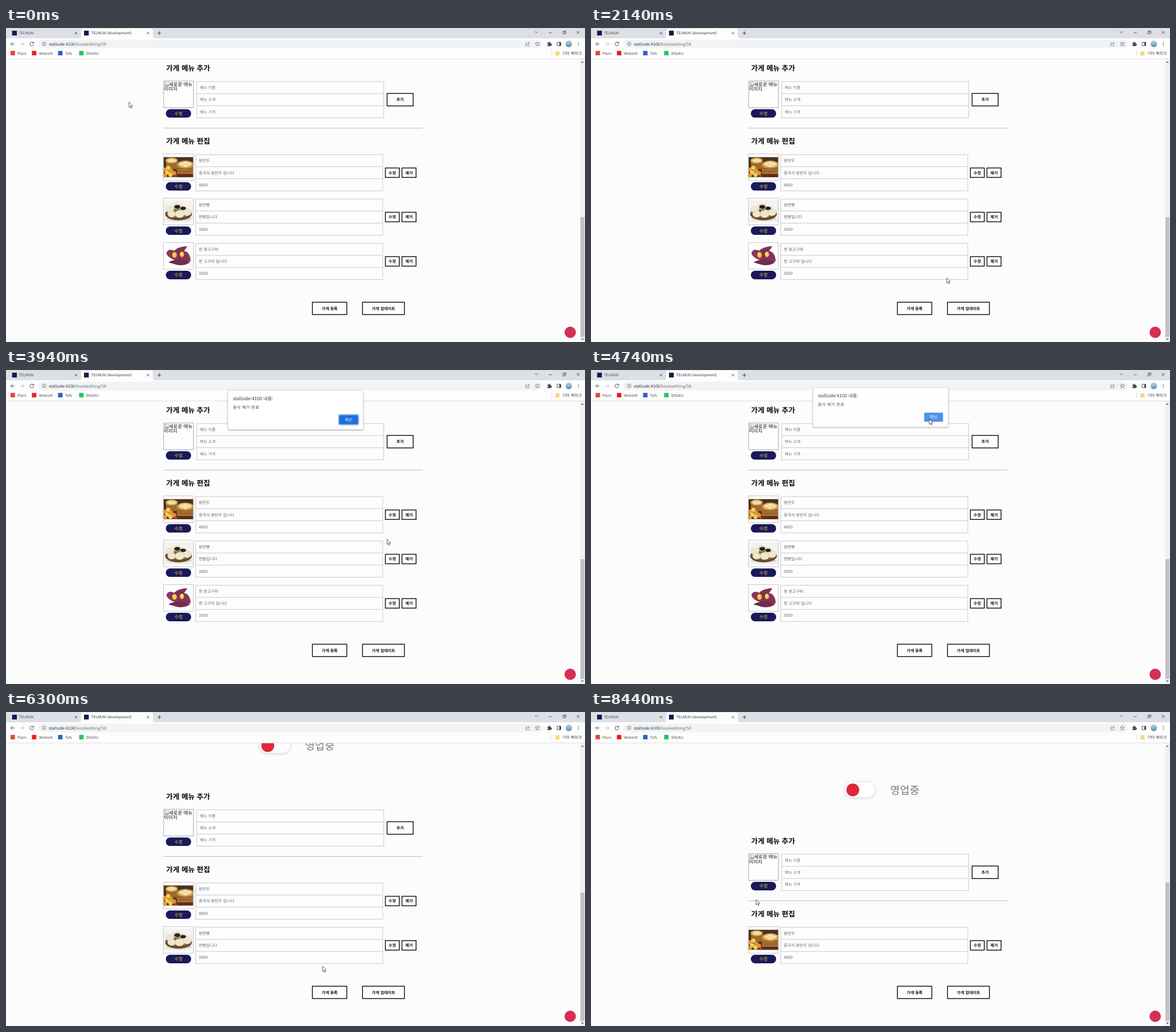
These frames come from a looping animation (1017x551 px, 8.48 s). An HTML page:

```html
<!DOCTYPE html>
<html lang="ko">
<head>
<meta charset="utf-8">
<title>Menu editor</title>
<style>
html, body { margin: 0; width: 100%; height: 100%; overflow: hidden; background: #fcfcfc; }
svg { display: block; width: 100vw; height: 100vh; }
text { font-family: "Noto Sans CJK KR", "Noto Sans CJK", "Noto Sans", sans-serif; text-rendering: geometricPrecision; white-space: pre; }
</style>
</head>
<body>
<svg id="stage" viewBox="0 0 1017 551" xmlns="http://www.w3.org/2000/svg"></svg>
<script>
const LOOP = 8480, PITCH = 77.8;

// Shape helpers; text is placed by its left edge and vertical centre.
const text = (x, cy, size, str, fill = '#111', more = '') =>
  `<text x="${x}" y="${cy + size * .37}" font-size="${size}" fill="${fill}" ${more}>${str}</text>`;
const rect = (x, y, w, h, fill, more = '') =>
  `<rect x="${x}" y="${y}" width="${w}" height="${h}" fill="${fill}" ${more}/>`;
const circle = (x, y, r, fill, more = '') =>
  `<circle cx="${x}" cy="${y}" r="${r}" fill="${fill}" ${more}/>`;
const oval = (x, y, rx, ry, fill, more = '') =>
  `<ellipse cx="${x}" cy="${y}" rx="${rx}" ry="${ry}" fill="${fill}" ${more}/>`;
const path = (d, stroke, width = 1, fill = 'none') =>
  `<path d="${d}" stroke="${stroke}" stroke-width="${width}" fill="${fill}"/>`;
const group = (id, body, more = '') => `<g id="${id}" ${more}>${body}</g>`;

const BOLD = 'font-weight="700"', MID = 'text-anchor="middle"';
const LINE = '#c9c9d1';

const button = (x, y, w, h, label) =>
  rect(x + .7, y + .7, w - 1.4, h - 1.4, '#fdfdfd', 'stroke="#0c0c0c" stroke-width="1.4"') +
  text(x + w / 2, y + h / 2, 7.05, label, '#111', `${BOLD} ${MID}`);

const pill = cy =>
  rect(280.7, cy - 7.4, 44.5, 14.8, '#19195b', 'rx="7.4"') +
  text(303, cy, 7.9, '수정', '#f2c12e', `${MID} font-weight="500"`);

const fields = (x, y, lines, color) =>
  rect(x, y, 328.5, 63.6, '#fdfdfd', `stroke="${LINE}"`) +
  path(`M${x} ${y + 21.2}h328.5M${x} ${y + 42.4}h328.5`, LINE) +
  lines.map((s, i) => text(x + 5.2, y + 10.6 + i * 21.2, 7.05, s, color)).join('');

const dumplings =
  rect(277, 6, 52, 35, '#49311c') +
  rect(281, 12, 20, 15, '#a06a2c') + oval(291, 12, 11, 5, '#d3a14a') + oval(291, 12, 8, 3.4, '#efdcae') +
  rect(300, 20, 29, 16, '#a8702f') + path('M300 26h29M300 31h29', '#7c4d1d', .8) +
  oval(315, 19, 15, 7, '#c99645') + oval(315, 18.5, 12, 5.2, '#e6c583') +
  [[309, 18], [315, 16], [321, 18], [315, 21]].map(p => oval(...p, 3.4, 2, '#f4e6bf')).join('') +
  rect(300, 36, 29, 5, '#5d2a1c') +
  [[279, 28], [285, 25], [290, 30], [283, 33], [279, 38], [289, 37], [295, 34]]
    .map((p, i) => circle(...p, 3.8, i % 2 ? '#f3ce5d' : '#e2962f')).join('') +
  circle(298, 39, 2.5, '#c63a31');

const buns =
  rect(277, 4, 52, 39, '#f3f2f0') + oval(304, 36, 22, 4, '#d9d5cf') +
  oval(303, 28, 23.5, 11, '#69492d') + oval(303, 26, 21, 8.5, '#8f6b43') +
  [[288, 20, 7], [318, 25, 7.5], [291, 28, 7], [305, 28, 8]]
    .map(([x, y, r]) => oval(x, y, r, r * .82, '#ece8cf', 'stroke="#c9c2a0" stroke-width=".5"')).join('') +
  oval(300, 14, 8, 5.5, '#e9e3ca') + oval(301, 15.5, 5.5, 3.4, '#2f1d18') +
  oval(312, 18, 7, 5, '#e9e3ca') + oval(311, 18, 5, 3, '#2f1d18');

const potatoes =
  rect(277, 4, 52, 39, '#fdfdfd') +
  path('M295 16Q300 8 318 7Q313 16 305 22Z', '#5f1f3f', .5, '#7f3156') +
  path('M282 19Q284 11 293 14Q304 17 308 28Q306 34 298 31Q284 27 282 19Z', '#63203f', .5, '#8d365d') +
  path('M301 18Q310 12 319 18Q324 24 324 33Q311 35 303 28Z', '#63203f', .5, '#86335a') +
  path('M286 35Q300 26 323 35Q312 42 300 39Z', '#5a1c39', .5, '#752a4d') +
  oval(296, 22, 4, 5, '#f0c72f') + oval(309, 21, 3.6, 4.8, '#f3d040') +
  oval(295, 20.5, 1.4, 2.4, '#f9e67d') + oval(308.4, 19.5, 1.4, 2.2, '#f9e67d');

const MENU = [
  [dumplings, '왕만두', '중국식 왕만두 입니다', '4000'],
  [buns, '왕찐빵', '찐빵입니다', '3000'],
  [potatoes, '찐 왕고구마', '찐 고구마 입니다', '3500']
];

const row = ([photo, ...lines], i) => group('row' + i,
  rect(276.5, .3, 52.6, 46.8, '#fdfdfd') + photo +
  rect(276.5, .3, 52.6, 46.8, 'none', 'stroke="#c8c8cc"') +
  pill(57.3) + fields(333.3, 1.6, lines, '#636363') +
  button(665.7, 24.3, 25.8, 18, '수정') + button(694.8, 24.3, 26.2, 18, '제거'),
  `transform="translate(0 ${220.6 + i * PITCH})"`);

const page = group('page',
  rect(446, -32.2, 52.5, 26, '#fff', 'rx="13" filter="url(#soft)"') +
  circle(459.8, -18.9, 11.3, '#e0283a') +
  text(525.5, -18.2, 18.6, '영업중', '#777') +
  text(281.3, 70.3, 12.7, '가게 메뉴 추가', '#080808', BOLD) +
  rect(276.9, 93, 52.3, 46.8, '#fdfdfd', 'stroke="#a9a9a9"') +
  rect(278.4, 95, 7, 7.4, '#f6f8fa', 'stroke="#9aa3ab" stroke-width=".7"') +
  path('M279 101.8l2.4-3 1.6 1.7 2-1.5v2.8z', 'none', 0, '#5ca55e') +
  circle(281, 97.3, 1, '#6a9ad8') +
  text(286, 98.6, 8.5, '새로운 메뉴') + text(277.6, 106.8, 8.5, '이미지') +
  pill(149.9) + fields(335, 94, ['메뉴 이름', '메뉴 소개', '메뉴 가격'], '#747474') +
  button(668.7, 114, 47.2, 23.4, '추가') +
  path('M276.5 175.7H732', '#bcbcbc') +
  text(281.3, 198.7, 12.7, '가게 메뉴 편집', '#080808', BOLD) +
  MENU.map(row).join(''));

const footer =
  button(537.5, 480.5, 61.8, 23, '가게 등록') + button(625.5, 480.5, 75, 23, '가게 업데이트') +
  circle(991, 534, 10, '#d42f55') +
  rect(1008, 54, 9, 497, '#f1f1f1') + rect(1009, 332, 7, 210, '#c1c1c1', 'id="thumb"') +
  path('M1010.2 61l2.3-2.6 2.3 2.6z', 'none', 0, '#555') +
  path('M1010.2 545l2.3 2.6 2.3-2.6z', 'none', 0, '#555');

const cross = (x, y, r) => path(`M${x - r} ${y - r}l${2 * r} ${2 * r}m0 ${-2 * r}l${-2 * r} ${2 * r}`, '#333', .8);
const NAVY = '#17174f', SITE = 'TELMUN', HOST = 'stallside:4100';
const MARKS = [
  [8, 20, '#e0483c', 'Plarn'], [45.5, 58, '#ee1c1c', 'Wobrelt'],
  [91.5, 104, '#2b62bd', 'Tefs'], [128.5, 141, '#1fc95c', 'DOLKU']
];

const browser =
  rect(0, 0, 1017, 18, '#dce0e5') + rect(0, 18, 1017, 36.5, '#fdfdfd') +
  path('M0 54.3H1017', '#d5d7da', .8) +
  path('M128 18Q132 18 132 14V5Q132 1 136 1H254Q258 1 258 5V14Q258 18 262 18Z', 'none', 0, '#fdfdfd') +
  rect(10.7, 4.7, 8.4, 8.4, NAVY) + text(23, 8.9, 6.4, SITE, '#444') + cross(123, 9, 2) +
  rect(137, 4.7, 8.4, 8.4, NAVY) + text(149.6, 8.9, 6.4, SITE + ' (development)', '#333') + cross(249.5, 9, 2) +
  path('M266.2 9h6.4M269.4 5.8v6.4', '#333', .9) +
  path('M929 6l2.6 2.6 2.6-2.6M953.5 8.3h5', '#333', .8) +
  path('M978 6.6h3.8v3.8h-3.8zM979.4 6.4V5h4v4h-1.4', '#333', .7) + cross(1005, 7.7, 2.5) +
  path('M15 28H8.5M11.5 24.8l-3.2 3.2 3.2 3.2', '#444', .9) +
  path('M25 28h6.5M28.5 24.8l3.2 3.2-3.2 3.2', '#b5b7ba', .9) +
  path('M48.2 26.1A3.4 3.4 0 1 0 48.8 28.6M48.8 24.3v2.4h-2.5', '#444', .9) +
  rect(56.5, 20.4, 886.5, 15.2, '#f1f3f4', 'rx="7.6"') +
  circle(67, 27.8, 3.2, 'none', 'stroke="#555" stroke-width=".7"') + path('M67 27.2v2.4M67 25.8v.8', '#555', .8) +
  text(75, 27.9, 7.25, HOST + '<tspan fill="#6c7075">/kioskediting/58</tspan>', '#333') +
  path('M915 26h-2v5.2h6v-2M914.8 29.4q.4-3 4-3.2M917 24.3l2.4 2-2.4 2', '#666', .7) +
  path('M933.4 24l1.1 2.6 2.8.2-2.1 1.8.7 2.8-2.5-1.5-2.5 1.5.7-2.8-2.1-1.8 2.8-.2z', '#555', .7) +
  path('M951 26h2q-.4-2 1.2-2t1.2 2h2v2q1.6-.2 1.6 1.2t-1.6 1.2v1.4H951v-2q1.4 0 1.4-1t-1.4-1z', 'none', 0, '#484b4f') +
  path('M968 25h6.4v6h-6.4z', '#444', .9) + rect(972, 25, 2.6, 6, '#444') +
  circle(988.6, 27.8, 5.8, 'url(#sky)') +
  [25.2, 27.9, 30.6].map(y => circle(1005.4, y, .75, '#444')).join('') +
  MARKS.map(([x, tx, color, name]) => rect(x, 40.2, 7.8, 7.8, color) + text(tx, 44.2, 6.4, name, '#444')).join('') +
  path('M958.8 40v8.6', '#ccc', .7) + rect(965, 40.8, 7.2, 7.4, '#f8d877', 'rx=".8"') +
  text(977, 44.2, 7.05, '기타 북마크', '#444');

const dialog = group('dialog',
  rect(389.7, 35.7, 237.8, 68.8, '#fff', 'rx="2.2" stroke="#c4c6c9" stroke-width=".6" filter="url(#drop)"') +
  text(398.4, 49.7, 8.1, HOST + ' 내용:', '#333') +
  text(398.4, 65.2, 7.1, '음식 제거 완료', '#444', 'letter-spacing=".42"') +
  rect(584.2, 78.2, 35.2, 18, 'none', 'id="ring" rx="2.4" stroke="#3c80e0" stroke-width="1"') +
  rect(585.2, 79.2, 33.2, 16, '#1a6fdd', 'id="ok" rx="1.6"') +
  text(601.8, 87.1, 7.1, '확인', '#fff', MID));

const pointer = group('cursor',
  group('arrow', path('M0 0V9.4L2.1 7.4 3.6 10.8 5.1 10.1 3.6 6.8H6.5Z', '#222', .7, '#fff')) +
  group('hand', path('M-1 1Q0-.4 1 1V5.2Q2.2 4.5 2.7 5.6 4 4.9 4.4 6.1 5.8 5.6 5.9 7.1V9.5Q5.8 11.3 4.9 12.6H-.4Q-1.4 10.6-3.3 8.4-3.8 6.9-2.3 7.1L-1 8.2Z', '#222', .8, '#fff')));

const $ = id => document.getElementById(id);
$('stage').innerHTML = `<defs>
  <filter id="soft" x="-40%" y="-60%" width="180%" height="220%"><feDropShadow dx="0" dy="1" stdDeviation="3" flood-color="#223" flood-opacity=".2"/></filter>
  <filter id="drop" x="-5%" y="-10%" width="110%" height="130%"><feDropShadow dx="0" dy="1" stdDeviation="1.3" flood-opacity=".35"/></filter>
  <linearGradient id="sky" x2="0" y2="1"><stop stop-color="#a9cde6"/><stop offset=".55" stop-color="#8db4cc"/><stop offset="1" stop-color="#4f7f98"/></linearGradient>
</defs>` + rect(0, 0, 1017, 551, '#fcfcfc') + page + footer + browser + dialog + pointer;

// Pointer track: time, x, y.
const TRACK = [
  [0, 216, 130], [40, 216, 130], [370, 232, 300], [940, 232, 300], [1300, 257, 478], [1800, 480, 466],
  [2500, 710.5, 415], [2700, 710.5, 415], [2740, 710.5, 412], [3600, 710.5, 412], [4450, 594, 86],
  [4820, 594, 86], [5370, 570, 300], [5740, 570, 300], [6300, 556, 446], [6600, 709, 412],
  [6930, 709, 412], [7300, 535, 85], [7480, 597, 87], [7660, 597, 87], [8300, 246, 402],
  [8440, 290, 329], [LOOP, 290, 329]
];
const ALERTS = [[3560, 4715], [6960, 7620]];
const REMOVED = [4980, 7840];
const THUMB = { 3: 332, 2: 317, 1: 299 };

const slope = (i, k) => {
  const a = TRACK[i], b = TRACK[i + 1];
  return a && b ? (b[k] - a[k]) / (b[0] - a[0]) : 0;
};
// Monotone tangent: smooth through waypoints, still at rests.
const tangent = (i, k) => {
  const a = slope(i - 1, k), b = slope(i, k);
  return a * b > 0 ? 2 * a * b / (a + b) : 0;
};
function trackAt(t, k) {
  let i = 0;
  while (i < TRACK.length - 2 && t >= TRACK[i + 1][0]) i++;
  const a = TRACK[i], b = TRACK[i + 1], d = b[0] - a[0], u = (t - a[0]) / d, v = 1 - u;
  return a[k] * v * v * (1 + 2 * u) + b[k] * u * u * (1 + 2 * v) +
    d * u * v * (tangent(i, k) * v - tangent(i + 1, k) * u);
}

const inside = (x, y, l, t, r, b) => x >= l && x <= r && y >= t && y <= b;
const show = (id, on) => $(id).setAttribute('visibility', on ? 'visible' : 'hidden');
const move = (id, x, y) => $(id).setAttribute('transform', `translate(${x} ${y})`);

function draw(t) {
  const count = 3 - REMOVED.filter(r => t >= r).length;
  move('page', 0, (3 - count) * PITCH);
  MENU.forEach((_, i) => { $('row' + i).style.display = i < count ? '' : 'none'; });
  $('thumb').setAttribute('y', THUMB[count]);
  $('thumb').setAttribute('height', 542 - THUMB[count]);

  const x = trackAt(t, 1), y = trackAt(t, 2);
  const alertNow = ALERTS.find(([a, b]) => t >= a && t < b + 100);
  $('dialog').style.display = alertNow ? '' : 'none';
  if (alertNow) {
    const enter = 1 - Math.min(1, (t - alertNow[0]) / 150);
    const leave = Math.max(0, (t - alertNow[1]) / 100);
    move('dialog', 0, -8 * enter * enter - 17 * leave);
    $('dialog').setAttribute('opacity', (1 - enter) * (1 - leave * leave));
    const hover = inside(x, y, 585, 75, 619, 96);
    $('ok').setAttribute('fill', hover ? '#468be6' : '#1a6fdd');
    $('ring').style.display = hover ? 'none' : '';
  }

  const hand = !alertNow && (inside(x, y, 695, 401, 721, 419) || inside(x, y, 666, 401, 691, 419));
  show('hand', hand);
  show('arrow', !hand);
  move('cursor', x, y);
}

const start = performance.now();
function tick() {
  draw((performance.now() - start) % LOOP);
  requestAnimationFrame(tick);
}
tick();
</script>
</body>
</html>
```
